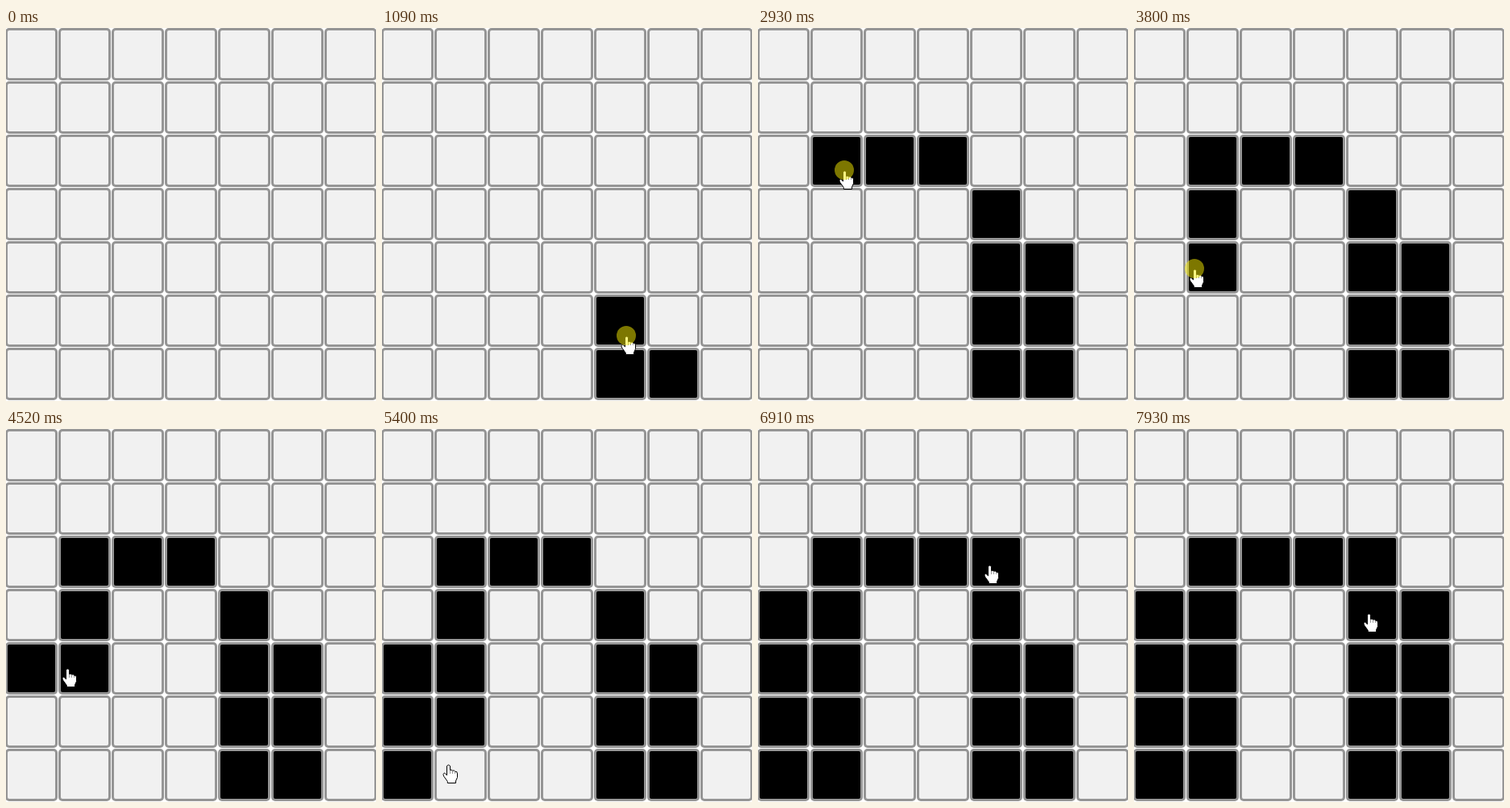
These frames come from a looping animation (459x462 px, 8 s). An HTML page with a canvas:

```html
<!DOCTYPE html>
<html lang="en">
<head>
<meta charset="utf-8">
<title>Painting cells on a grid</title>
<style>
  html, body { margin: 0; width: 100%; height: 100%; overflow: hidden; background: #fff; }
  canvas { display: block; }
</style>
</head>
<body>
<canvas id="stage" width="459" height="462"></canvas>
<script>
const ctx = document.getElementById('stage').getContext('2d');
const LOOP = 8000, PITCH = 66, COUNT = 7, HOLD = 80;
const legs = [], presses = [];

const cellAt = ([x, y]) => ({ col: Math.floor(x / PITCH), row: Math.floor(y / PITCH) });

// The pointer presses wherever it leaves a stop over a blank cell
function press(time, stop) {
  const { col, row } = cellAt(stop);
  const taken = presses.some(p => p.col === col && p.row === row);
  if (row < COUNT && !taken) presses.push({ time, col, row });
}

// One move from the previous stop through evenly timed stops
function leg(start, end, ...stops) {
  const points = [legs.length ? legs[legs.length - 1].points.at(-1) : [300, 464], ...stops];
  legs.push({ start, end, points });
  stops.forEach((_, i) => press(start + (end - start) * i / stops.length, points[i]));
}

leg(140, 460, [342, 430]);
leg(620, 1490, [308, 426], [302, 372], [350, 362], [354, 304]);
leg(1490, 2050, [300, 303], [301, 234]);
leg(2050, 2770, [236, 186], [163, 178], [107, 176]);
leg(2930, 3650, [80, 235], [75, 298]);
leg(3800, 4520, [42, 298], [76, 296]);
leg(4520, 4680, [82, 348]);
leg(4680, 5400, [45, 362], [42, 420], [82, 415]);
leg(5480, 6360, [45, 235], [281, 169]);
leg(6440, 6700, [281, 169]);
leg(6700, 6750, [287, 168]);
leg(6910, 7390, [340, 205], [359, 212]);
leg(7700, 7860, [291, 228]);

const hand = new Path2D(
  'M-1.5 2.3Q.5-.2 2.5 2.3V7.6Q4.2 6.4 5.6 8.2Q7.4 7.2 8.6 9.2Q11.5 8.6 11.5 12' +
  'V16.5L9.5 21V23.5H-.7V21.5L-5.2 15.3Q-7 11.6-4.3 11.2L-1.5 13.8Z');
const knuckles = new Path2D('M2.5 8V12M5.5 8.8V12M8.5 9.8V12');

function pointerAt(time) {
  const { start, end, points } = legs.filter(l => l.start <= time).pop();
  const held = Math.floor((time - start) / (HOLD - 1)) * HOLD;
  const progress = Math.min(1, held / (end - start)) * (points.length - 1);
  const i = Math.min(Math.floor(progress), points.length - 2);
  return points[i].map((v, axis) => Math.round(v + (points[i + 1][axis] - v) * (progress - i)));
}

function roundBox(x, y, size, radius, color) {
  ctx.fillStyle = color;
  ctx.beginPath();
  ctx.roundRect(x, y, size, size, radius);
  ctx.fill();
}

function drawCell(col, row, painted) {
  const x = col * PITCH - 1, y = row * PITCH;
  roundBox(x, y, 65, 5, '#959595');
  roundBox(x + 3, y + 3, 59, 2, painted ? '#000' : '#f1f1f1');
}

function drawPointer([x, y], pressed) {
  ctx.save();
  ctx.translate(x, y);
  ctx.lineWidth = 1;
  ctx.fillStyle = '#fff';
  ctx.fill(hand);
  ctx.strokeStyle = '#000';
  ctx.stroke(hand);
  ctx.strokeStyle = 'rgba(0, 0, 0, 0.4)';
  ctx.stroke(knuckles);
  if (pressed) {
    ctx.fillStyle = 'rgba(255, 242, 0, 0.49)';
    ctx.beginPath();
    ctx.arc(0, 0, 12, 0, Math.PI * 2);
    ctx.fill();
  }
  ctx.restore();
}

function draw(time) {
  ctx.fillStyle = '#fff';
  ctx.fillRect(0, 0, 459, 462);
  const done = presses.filter(p => p.time <= time);
  for (let row = 0; row < COUNT; row++)
    for (let col = 0; col < COUNT; col++)
      drawCell(col, row, done.some(p => p.col === col && p.row === row));
  if (time >= legs[0].start)
    drawPointer(pointerAt(time), done.some(p => time - p.time < HOLD));
}

const began = performance.now();
function tick() {
  draw((performance.now() - began) % LOOP);
  requestAnimationFrame(tick);
}
tick();
</script>
</body>
</html>
```
